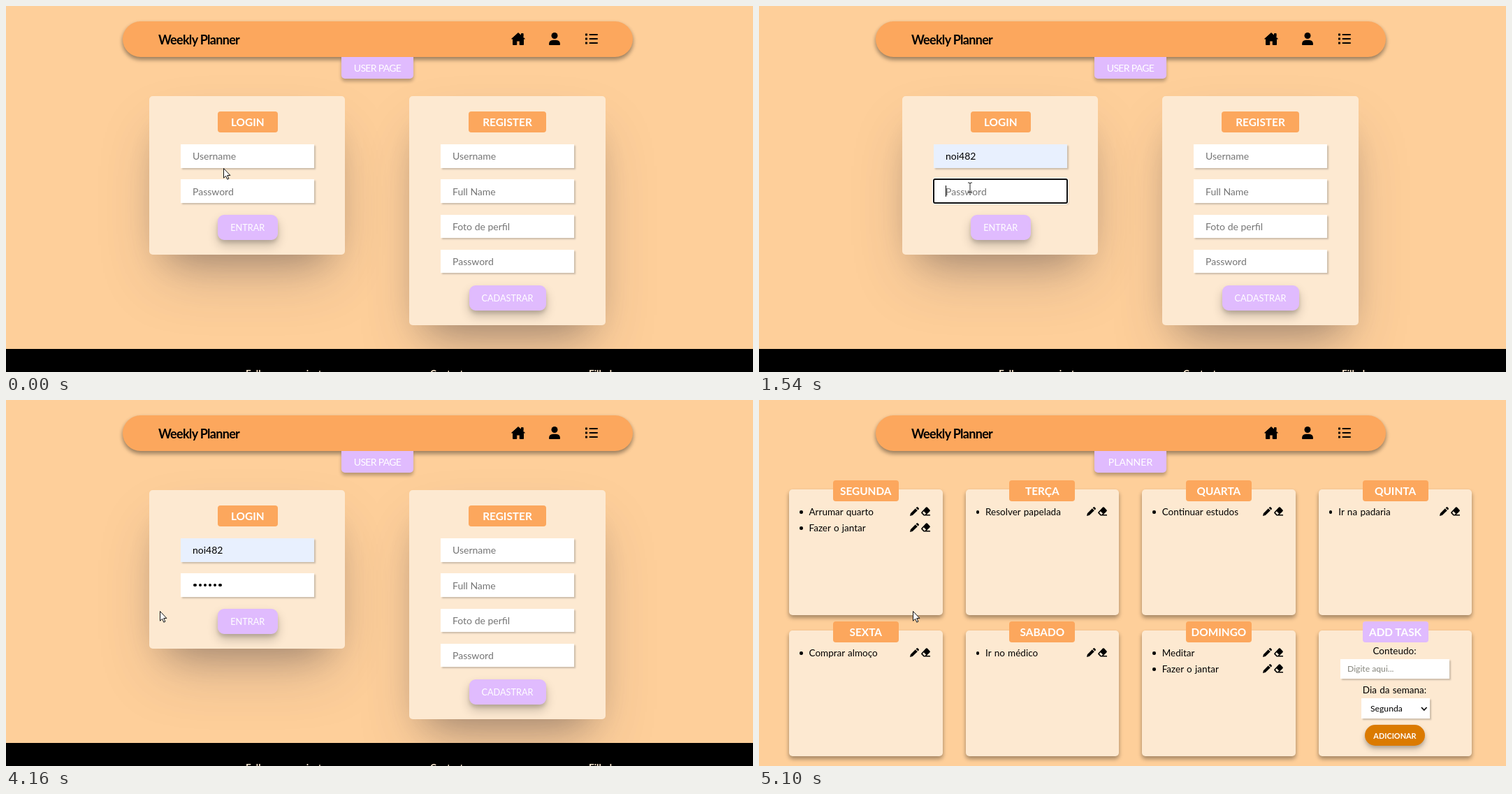
These frames come from a looping animation (1069x524 px, 5.98 s). An HTML page:

```html
<!DOCTYPE html>
<html lang="pt">
<head>
<meta charset="utf-8">
<title>Weekly Planner</title>
<style>
  html, body { margin: 0; width: 100%; height: 100%; overflow: hidden; background: #fecf9a; }
  #stage { position: relative; width: 1069px; height: 524px; overflow: hidden;
    background: #fecf9a; font: 14px Lato, sans-serif; color: #111; }
  #stage div, svg { position: absolute; box-sizing: border-box; }
  #stage div { display: flex; align-items: center; justify-content: center; white-space: pre; }
  svg { overflow: visible; left: 0; top: 0; width: 1px; height: 1px; }
  #stage .page { left: 0; top: 0; width: 100%; height: 100%; }
  #stage .left { justify-content: flex-start; }

  .bar { background: #fca75d; border-radius: 26px; box-shadow: 0 3px 6px #0003, 0 4px 6px #0004; }
  .title { font-size: 18px; font-weight: 700; letter-spacing: -.7px; color: #000; }
  .tab { background: #e0bbfe; border-radius: 0 0 5px 5px; color: #fff; font-size: 14px;
    box-shadow: 0 4px 5px #0004; padding-bottom: 1px; }
  .tight { letter-spacing: -.7px; }
  .panel { background: #fde9d1; border-radius: 5px;
    box-shadow: 0 43px 86px -17px rgba(50, 50, 93, .25), 0 26px 52px -26px rgba(0, 0, 0, .3); }
  .badge { background: #fca75d; border-radius: 4px; color: #fff; font-weight: 700; font-size: 15.4px; }
  .lilac { background: #e0bbfe; }
  .field { background: #fff; color: #757575; padding-left: 17px; box-shadow: 1.5px 1.5px 2px #0003; }
  .filled { background: #e8f0fe; color: #000; }
  .preview { font: 12px "Open Sans", sans-serif; }
  .focus { border: 2px solid #101010; border-radius: 3px; box-shadow: 0 0 0 1px #fff; }
  .caret { background: #000; }
  .dot { background: #000; border-radius: 50%; }
  .btn { background: #e0bbfe; border: 2px solid #e0bbfe; border-radius: 9px; color: #fff;
    font-size: 12.7px; box-shadow: 0 8px 15px #0003, 0 4px 5px #0002; }
  .hot { animation: hover 5980ms linear infinite; }
  .list { background: #292a2d; border-radius: 2px; box-shadow: 0 1px 3px #0006; }
  .row { color: #f1f1f1; font: 600 10.5px "Open Sans", sans-serif; padding-left: 9px; }
  .lit { background: #3f4042; }
  .foot { background: #000; }
  .link { color: #fde9d1; font-weight: 700; font-size: 13.5px; }
  .card { background: #fde9d1; border-radius: 5px; box-shadow: 0 3px 6px #0002, 0 4px 6px #0004; }
  .task, .label { font-size: 13.5px; word-spacing: .06em; color: #000; }
  .small { font-size: 12.2px; padding-left: 10px; color: #85857c; }
  .select { font-size: 12.2px; padding-left: 13px; color: #000; }
  .add { background: #db7a00; border-radius: 15px; color: #fff; font-weight: 700; font-size: 10.9px;
    box-shadow: 0 5px 9px #0003, 0 3px 4px #0002; }

  #stage #mouse { left: 0; top: 0; width: 0; height: 0; animation: mouse 5980ms linear infinite; }
  #mouse svg { left: 0; top: 0; }

  @keyframes hover {
    0%, 60.2% { background-color: #e0bbfe; }
    63.38%, 67.56% { background-color: #a93cff; }
    69.57%, 100% { background-color: #e0bbfe; }
  }
  @keyframes mouse {
    0%, .67% { transform: translate(311px, 232px); animation-timing-function: ease-in-out; }
    6.69%, 11.54% { transform: translate(303px, 214px); animation-timing-function: ease-out; }
    14.72% { transform: translate(307px, 250px); }
    16.72%, 17.73% { transform: translate(306px, 254px); animation-timing-function: ease-in-out; }
    21.4%, 56.52% { transform: translate(302px, 260px); animation-timing-function: ease-in-out; }
    61.87%, 67.06% { transform: translate(330px, 302px); animation-timing-function: ease-in-out; }
    69.57%, 100% { transform: translate(220px, 302px); }
  }
</style>
</head>
<body>
<svg aria-hidden="true">
  <symbol id="home" overflow="visible">
    <path d="M10 .6 19.4 9h-1.9v8.5h-5.3V12H7.8v5.5H2.5V9H.6ZM14.5 1.5h2.6V6h-2.6Z"
      stroke="#000" stroke-linejoin="round"/>
  </symbol>
  <symbol id="user" overflow="visible">
    <circle cx="8" cy="4.5" r="4.5"/><path d="M0 17q0-6.3 6-6.3h4q6 0 6 6.3 0 1-1 1H1q-1 0-1-1Z"/>
  </symbol>
  <symbol id="menu" overflow="visible">
    <path d="M0 2h3M0 8h3M0 14h3" stroke="#000" stroke-width="3"/>
    <path d="M6.5 2H17M6.5 8H17M6.5 14H17" stroke="#000" stroke-width="2" stroke-linecap="round"/>
  </symbol>
  <symbol id="pencil" overflow="visible">
    <path d="M0 13 .9 9.2 7.8 2.3l3 3-7 6.8ZM8.6 1.5l1-1q.9-.8 1.8 0l1.2 1.2q.8.9 0 1.8l-1 1Z"/>
  </symbol>
  <symbol id="eraser" overflow="visible">
    <path fill-rule="evenodd" d="M7 .6q.9-.8 1.8 0l3.7 3.8q.8.9 0 1.8L7.8 11H13v1.4H3.6L.5 9.2q-.8-.9 0-1.8ZM3.8 6.2 1.9 8.3 4.4 11h1.3L7 9.5Z"/>
  </symbol>
</svg>
<div id="stage"></div>
<script>
const LOOP = 5980;
const PAGE = 4750, READY = 4800, ICONS = 5100;
const stage = document.getElementById('stage');
const sheet = document.head.appendChild(document.createElement('style'));
let count = 0;

// Shows el only within the given [from, to) spans, in ms.
function during(el, ...spans) {
  const name = 'on' + count++;
  const pct = ms => (ms / LOOP * 100).toFixed(3) + '%';
  let css = spans[0][0] > 0 ? '0% { opacity: 0 }' : '';
  for (const [from, to] of spans) {
    css += `${pct(from)} { opacity: 1 }`;
    if (to < LOOP) css += `${pct(to)} { opacity: 0 }`;
  }
  css += `100% { opacity: ${spans.at(-1)[1] < LOOP ? 0 : 1} }`;
  sheet.textContent += `@keyframes ${name} { ${css} }\n`;
  el.style.animation = `${name} ${LOOP}ms step-end infinite`;
  return el;
}

function box(parent, x, y, w, h, cls, text = '') {
  const el = document.createElement('div');
  el.className = cls;
  el.textContent = text;
  Object.assign(el.style, { left: x + 'px', top: y + 'px', width: w + 'px', height: h + 'px' });
  parent.append(el);
  return el;
}

function page(parent, from, to) {
  const el = document.createElement('div');
  el.className = 'page';
  parent.append(el);
  return during(el, [from, to]);
}

function draw(parent, x, y, markup) {
  parent.insertAdjacentHTML('beforeend', `<svg style="left:${x}px;top:${y}px">${markup}</svg>`);
  return parent.lastElementChild;
}

const icon = (parent, x, y, id) => draw(parent, x, y, `<use href="#${id}"/>`);

function header(parent, dx, tab, cls = '') {
  box(parent, 167 + dx, 22, 730, 51, 'bar');
  box(parent, 218 + dx, 36, 120, 23, 'title left', 'Weekly Planner');
  box(parent, 480 + dx, 73, 103, 31, 'tab ' + cls, tab);
}

function nav(parent) {
  icon(parent, 723, 38, 'home');
  icon(parent, 777, 38, 'user');
  icon(parent, 829, 39, 'menu');
}

function day(parent, x, y, w, name, tasks, tools) {
  box(parent, x, y, w, 180, 'card');
  box(parent, x + w / 2 - 47, y - 13, 94, 30, 'badge', name);
  tasks.forEach((task, i) => {
    const mid = y + 31.5 + 23 * i;
    box(parent, x + 15, mid - 1.5, 4.5, 4.5, 'dot');
    box(parent, x + 28.5, mid - 11, 140, 23, 'task left', task);
    if (!tools) return;
    icon(tools, x + 173, mid - 7, 'pencil');
    icon(tools, x + 189, mid - 7, 'eraser');
  });
}

const week = [
  ['SEGUNDA', ['Arrumar quarto', 'Fazer o jantar']],
  ['TERÇA', ['Resolver papelada']],
  ['QUARTA', ['Continuar estudos']],
  ['QUINTA', ['Ir na padaria']],
  ['SEXTA', ['Comprar almoço']],
  ['SABADO', ['Ir no médico']],
  ['DOMINGO', ['Meditar', 'Fazer o jantar']]
];

function loginPage() {
  const p = page(stage, 0, PAGE);
  header(p, 0, 'USER PAGE', 'tight');
  nav(p);

  box(p, 205, 129, 280, 227, 'panel');
  box(p, 577, 129, 281, 328, 'panel');

  box(p, 662, 151, 111, 30, 'badge', 'REGISTER');
  ['Username', 'Full Name', 'Foto de perfil', 'Password'].forEach((label, i) =>
    box(p, 622, 198 + 50.3 * i, 191, 33.5, 'field left', label));
  box(p, 662.5, 400, 110, 36, 'btn', 'CADASTRAR');

  box(p, 303, 151, 85.5, 30, 'badge', 'LOGIN');
  box(p, 303, 299, 85.5, 36, 'btn hot', 'ENTRAR');

  const name = (cls, text) => box(p, 250, 198, 191, 33.5, 'field left ' + cls, text);
  during(name('', 'Username'), [0, 800]);
  during(name('filled preview', 'noi482'), [800, 1060]);
  during(name('filled', 'noi482'), [1060, PAGE]);

  box(p, 250, 248.3, 191, 33.5, 'field left');
  const hint = box(p, 267, 248.3, 80, 33.5, 'left', 'Password');
  hint.style.color = '#757575';
  during(hint, [0, 2160]);

  const caret = (x, y, from, to) => during(box(p, x, y, 1, 16, 'caret'), [from, to]);
  during(box(p, 249, 197, 193, 35, 'focus'), [430, 1500]);
  caret(267, 207, 430, 1060);
  caret(310, 207, 1060, 1500);
  during(box(p, 249, 247.3, 193, 35.5, 'focus'), [1500, 3840]);
  caret(267, 257, 1500, 2020);

  const keys = [2160, 2330, 2490, 2870, 3030, 3130, 3630];
  keys.slice(0, 6).forEach((time, i) => {
    during(box(p, 268.4 + 7.2 * i, 263, 4.2, 4.2, 'dot'), [time, PAGE]);
    caret(Math.round(274.6 + 7.2 * i), 257, time, keys[i + 1]);
  });

  const foot = box(p, 0, 491, 1069, 33, 'foot');
  foot.style.overflow = 'hidden';
  [[343, 'Follow our project'], [607, 'Contact'], [834, 'Filbok']].forEach(([x, text]) =>
    box(foot, x, 24, 130, 22, 'link left', text));

  const list = during(box(p, 249, 233, 192, 199, 'list'), [460, 1060]);
  during(box(list, 0, 6.5, 192, 31, 'lit'), [800, 1060]);
  ['noi482', 'noitirela', 'dreno482', '4830591', 'sorvilu', 'noitir@rede.example'].forEach((text, i) =>
    box(list, 0, 6.5 + 31 * i, 192, 31, 'row left', text));
}

function plannerPages() {
  const first = page(stage, PAGE, READY);
  header(first, 7, 'PLANNER');
  week.slice(0, 4).forEach(([name, tasks], i) =>
    day(first, 44.5 + 255.5 * i, 228.5, 222, name, tasks));

  const p = page(stage, READY, LOOP);
  header(p, 0, 'PLANNER');
  const tools = page(stage, ICONS, LOOP);
  nav(tools);
  const at = i => [43 + 252.6 * (i % 4), i < 4 ? 128 : 330];
  week.forEach(([name, tasks], i) => day(p, ...at(i), 219.5, name, tasks, tools));

  day(p, ...at(7), 219.5, 'ADD TASK', []);
  p.lastElementChild.classList.add('lilac');
  box(p, 830, 348, 159, 22, 'label', 'Conteudo:');
  box(p, 832, 371, 156, 27.5, 'field small left', 'Digite aqui...');
  box(p, 830, 404, 159, 22, 'label', 'Dia da semana:');
  box(p, 862, 427, 98, 29, 'field select left', 'Segunda');
  draw(p, 948, 440, '<path d="M0 0 3.8 4 7.6 0" fill="none" stroke="#111" stroke-width="1.8"/>');
  box(p, 867, 465, 86, 30, 'add', 'ADICIONAR');
}

function pointer() {
  const mouse = box(stage, 0, 0, 0, 0, '');
  mouse.id = 'mouse';
  const shape = (markup, ...spans) => during(draw(mouse, 0, 0, markup), ...spans);
  shape('<circle r="10.5" fill="#f2e22c" opacity=".65"/>', [400, 500], [980, 1060], [1470, 1540], [3760, 3860]);
  shape('<path d="M.5.5V14.2L3.6 11.3 5.8 16.2 7.9 15.2 5.7 10.5H9.9Z" fill="#fff" stroke="#111"/>',
    [0, 80], [790, 1060], [3540, 3640], [4050, LOOP]);
  shape('<path d="M-3-7h2l1 1 1-1h2M0-6V6M-3 7h2l1-1 1 1h2" fill="none" stroke="#222"/>',
    [80, 790], [1060, 3540]);
  shape('<path transform="translate(1 1)" d="M-1.6 1.4Q-1.6 0 0 0T1.6 1.4V6Q3.5 5 4.3 6.6 6 5.8 6.8 7.4 9 6.8 9 9v4q0 2-1.5 5H-1l-4.3-6.5Q-6 9.6-4.3 9.6l2.7 2Z" fill="#fff" stroke="#111"/>',
    [3640, 4050]);
}

loginPage();
plannerPages();
pointer();
</script>
</body>
</html>
```
